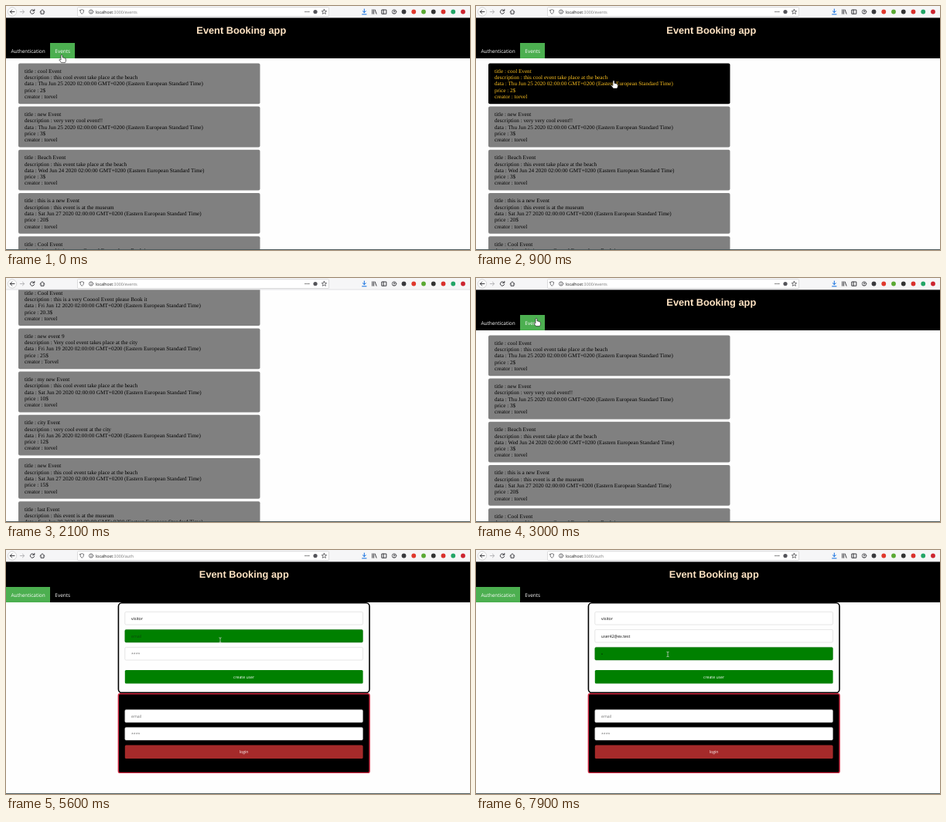
These frames come from a looping animation (600x317 px, 8000 ms). An HTML page:

```html
<!DOCTYPE html>
<html lang="en">
<head>
<meta charset="utf-8">
<title>Event Booking app</title>
<style>
  html, body { margin: 0; width: 100%; height: 100%; overflow: hidden; background: #fefefe; }
  svg { display: block; width: 600px; height: 317px; }
  text { font-family: "Open Sans", "Noto Sans", sans-serif; white-space: pre; text-rendering: geometricPrecision; }
  .title { font: bold 12.8px "Liberation Sans", Arial, sans-serif; fill: bisque; text-anchor: middle; }
  .tab { font-size: 6.47px; fill: #fff; }
  .url { font-size: 5.3px; fill: #777; }
  .url .host { fill: #111; }
  .card rect { fill: #808080; }
  .card text { font: 7.2px "Liberation Serif", "Times New Roman", serif; fill: #000; }
  .card.hover rect { fill: #000; }
  .card.hover text { fill: #ffc321; }
  .field rect { fill: #fff; stroke: #ccc; stroke-width: .5; }
  .field text, .button text { font-size: 5.2px; }
  .field text { fill: #000; }
  .field.empty text { fill: #757575; }
  .field.focus rect { fill: #008000; stroke: #0a6b0a; }
  .field.focus.empty text { fill: #0a4a0a; }
  .button text { fill: #fff; text-anchor: middle; }
  .line { fill: none; stroke: #3c3c40; stroke-width: 1; stroke-linecap: round; stroke-linejoin: round; }
  .thin { stroke-width: .7; }
</style>
</head>
<body>
<svg viewBox="0 0 600 317">
  <g id="page">
    <rect y="15" width="600" height="53" fill="#000"/>
    <text id="title" class="title" y="36.4">Event Booking app</text>
    <rect id="active" y="48" height="20" fill="#4caf50"/>
    <text class="tab" x="6.4" y="60.6">Authentication</text>
    <text class="tab" x="63.3" y="60.6">Events</text>
    <g id="events"></g>
    <g id="auth">
      <rect x="145.4" y="68.8" width="324.6" height="116.6" rx="4.5" fill="#fefefe" stroke="#000" stroke-width="1.6"/>
      <rect x="145.3" y="186.8" width="324.8" height="102.6" rx="2.2" fill="#000" stroke="#d0263f" stroke-width="1.4"/>
    </g>
  </g>

  <g id="toolbar">
    <rect width="600" height="15.2" fill="#f6f6f7"/>
    <path d="M0 15H600" stroke="#c9c9cc" stroke-width=".5"/>
    <circle cx="8" cy="7.5" r="5.6" fill="#fff" stroke="#bbb" stroke-width=".6"/>
    <path class="line" d="M11 7.5H5.4M7.8 5L5.3 7.5L7.8 10"/>
    <path class="line" style="stroke:#b5b5b8" d="M18.3 7.5H23.7M21.4 5.2L23.8 7.5L21.4 9.8"/>
    <path class="line" d="M36.3 6A2.7 2.7 0 1 0 36.6 8.4M36.8 4.3V6.4H34.7"/>
    <path class="line" d="M44 7.6L47 4.7L50 7.6M45 7.2V10.2H49V7.2"/>
    <rect x="92.5" y="1.7" width="325" height="11.8" rx="1" fill="#fff" stroke="#c8c8ca" stroke-width=".6"/>
    <path class="line thin" d="M95.8 5.5L98.2 4.6L100.6 5.5Q100.6 9 98.2 10.4Q95.8 9 95.8 5.5Z"/>
    <g class="line thin"><circle cx="110" cy="7.5" r="2.6"/><path d="M110 7.3V8.8M110 6V6.1"/></g>
    <text class="url" x="116" y="9.6"><tspan class="host">localhost</tspan><tspan id="path"></tspan></text>
    <g fill="#444"><circle cx="387" cy="7.5" r=".7"/><circle cx="389.3" cy="7.5" r=".7"/><circle cx="391.6" cy="7.5" r=".7"/></g>
    <circle cx="400" cy="7.5" r="2.6" fill="#55555a"/>
    <path class="line thin" d="M411.4 4.3L412.3 6.4L414.6 6.6L412.9 8.1L413.4 10.3L411.4 9.2L409.4 10.3L409.9 8.1L408.2 6.6L410.5 6.4Z"/>
    <path class="line" style="stroke:#0a6be0" d="M463.3 4V8.4M461.4 6.7L463.3 8.6L465.2 6.7M460.6 10.8H466"/>
    <path class="line" d="M473.7 4.8V10.2M475.6 4.8V10.2M477.2 5L479 10.2"/>
    <path class="line" d="M486.2 5H491.8V10.2H486.2ZM488.2 5V10.2"/>
    <g class="line thin"><circle cx="502" cy="7.5" r="2.8"/><circle cx="502" cy="6.7" r=".9"/><path d="M500.4 9.3H503.6"/></g>
  </g>
  <path d="M0 316.5H600" stroke="#4c5a5c" stroke-width="1"/>

  <g id="hand">
    <path d="M-1 1Q0-.6 1 1V4Q2 3.4 2.7 4.4Q3.7 4 4.2 5Q5.4 4.9 5.4 6V8.3Q5 9.6 4.4 10.6H-.6Q-1.8 8.6-3.3 6.8Q-2.6 5.6-1 7Z" fill="#fff" stroke="#111" stroke-width=".6"/>
  </g>
  <path id="arrow" d="M0 0V8.6L2 6.8L3.4 9.8L4.8 9.2L3.5 6.3H6.2Z" fill="#fff" stroke="#111" stroke-width=".6"/>
  <path id="beam" class="line thin" d="M-1.2-3.2Q0-3.2 0-2.4Q0-3.2 1.2-3.2M0-2.5V2.5M-1.2 3.2Q0 3.2 0 2.4Q0 3.2 1.2 3.2" style="stroke:#d8d8d8"/>
</svg>
<script>
const $ = id => document.getElementById(id);
const LOOP = 8000, STEP = 100;

function add(parent, tag, attrs = {}, text) {
  const el = document.createElementNS("http://www.w3.org/2000/svg", tag);
  for (const key in attrs) el.setAttribute(key, attrs[key]);
  if (text !== undefined) el.textContent = text;
  parent.append(el);
  return el;
}

// Toolbar add-ons
["#3a3a3d", "#e0392d", "#5aa934", "#333", "#d9302c", "#22a567", "#cc2430"].forEach((fill, i) =>
  add($("toolbar"), "circle", { cx: 514.5 + i * 12.75, cy: 7.5, r: 2.9, fill }));

// Event cards: title, description, day, price, creator
const CARD = { x: 16, y: 74.4, w: 312.5, h: 52.8, pitch: 56.2 };
const beach = "this cool event take place at the beach";
const cards = [
  ["cool Event", beach, "Thu Jun 25", "2$"],
  ["new Event", "very very cool event!!", "Thu Jun 25", "3$"],
  ["Beach Event", "this event take place at the beach", "Wed Jun 24", "3$"],
  ["this is a new Event", "this event is at the museum", "Sat Jun 27", "20$"],
  ["Cool Event", "this is a very Cooool Event please Book it", "Fri Jun 12", "20.3$"],
  ["new event 9", "Very cool event takes place at the city", "Fri Jun 19", "25$", "Torvel"],
  ["my new Event", beach, "Sat Jun 20", "10$"],
  ["city Event", "very cool event at the city", "Fri Jun 26", "12$"],
  ["new Event", beach, "Sat Jun 27", "15$"],
  ["last Event", "this event is at the museum", "Sun Jun 28", "5$"]
].map(([title, about, day, price, creator = "torvel"], i) => {
  const y = CARD.y + i * CARD.pitch;
  const g = add($("events"), "g", { class: "card" });
  add(g, "rect", { x: CARD.x, y, width: CARD.w, height: CARD.h, rx: 2 });
  [
    "title : " + title,
    "description : " + about,
    `data : ${day} 2020 02:00:00 GMT+0200 (Eastern European Standard Time)`,
    "price : " + price,
    "creator : " + creator
  ].forEach((line, n) => add(g, "text", { x: 24, y: y + 12.4 + n * 8.3 }, line));
  return { g, y };
});

// Forms
function makeField(y, hint) {
  const g = add($("auth"), "g", { class: "field empty" });
  add(g, "rect", { x: 153.8, y, width: 307.6, height: 16.6, rx: 1.6 });
  const label = add(g, "text", { x: 162, y: y + 10.2 }, hint);
  return { g, label, hint };
}
function makeButton(y, fill, text) {
  const g = add($("auth"), "g", { class: "button" });
  add(g, "rect", { x: 153.8, y, width: 307.8, height: 17.6, rx: 1.6, fill });
  add(g, "text", { x: 307.6, y: y + 10.8 }, text);
}
const fields = [[80.4, "username"], [103.4, "email"], [126.4, "****"]].map(a => makeField(...a));
makeButton(156, "#008000", "create user");
makeField(207.4, "email");
makeField(230.4, "****");
makeButton(253.4, "#a52a2a", "login");

// When each field takes focus, when typing starts, and what is typed
const entries = [
  { focus: 4300, type: 4600, text: "visitor" },
  { focus: 5500, type: 5800, text: "user42@ex.test" },
  { focus: 7500, type: 7900, text: "•" }
];

// [time, value...] keys with linear motion between them
const pointer = [
  [0, 72, 63], [100, 74, 66], [900, 178, 96.5], [1000, 230, 100], [1200, 450, 108], [1300, 612, 108],
  [2600, 612, 60], [3000, 78, 52], [3300, 32, 56], [4000, 30, 57],
  [4300, 294, 95], [5300, 294, 95], [5600, 277, 117], [7200, 277, 117], [7600, 248, 135.5]
];
const scrolling = [[1300, 0], [1600, 119.5], [2100, 290], [2200, 300], [2700, 0]];
const AUTH_AT = 3600;

function at(keys, t) {
  let i = keys.findIndex(k => k[0] > t);
  if (i < 0) return keys[keys.length - 1].slice(1);
  if (i === 0) return keys[0].slice(1);
  const a = keys[i - 1], b = keys[i];
  const p = (t - a[0]) / (b[0] - a[0]);
  return a.slice(1).map((v, n) => v + (b[n + 1] - v) * p);
}

const show = (el, on) => el.setAttribute("display", on ? "inline" : "none");

function draw(t) {
  const auth = t >= AUTH_AT;
  const [x, y] = at(pointer, t);
  const [scroll] = at(scrolling, t);

  $("page").setAttribute("transform", `translate(0 ${-scroll})`);
  show($("events"), !auth);
  show($("auth"), auth);
  $("title").setAttribute("x", auth ? 307.8 : 304.3);
  $("active").setAttribute("x", auth ? 0 : 57);
  $("active").setAttribute("width", auth ? 57 : 32);
  $("path").textContent = auth ? ":3000/auth" : ":3000/events";

  let onCard = false;
  for (const c of cards) {
    const top = c.y - scroll;
    const hit = !auth && x > CARD.x && x < CARD.x + CARD.w && y > top && y < top + CARD.h;
    c.g.classList.toggle("hover", hit);
    onCard = onCard || hit;
  }

  entries.forEach((e, i) => {
    const next = entries[i + 1];
    const count = Math.max(0, Math.floor((t - e.type) / STEP) + 1);
    const { g, label, hint } = fields[i];
    label.textContent = count ? e.text.slice(0, count) : hint;
    g.classList.toggle("empty", !count);
    g.classList.toggle("focus", t >= e.focus && (!next || t < next.focus));
  });

  const onTab = x < 89 && y > 48 && y < 68;
  const kind = auth && y > 78 && x > 154 ? "beam" : onCard || onTab ? "hand" : "arrow";
  for (const id of ["hand", "arrow", "beam"]) {
    show($(id), id === kind);
    $(id).setAttribute("transform", `translate(${x} ${y})`);
  }
}

const start = performance.now();
function tick() {
  const t = (performance.now() - start) % LOOP;
  draw(Math.floor(t / STEP) * STEP);
  requestAnimationFrame(tick);
}
tick();
</script>
</body>
</html>
```
